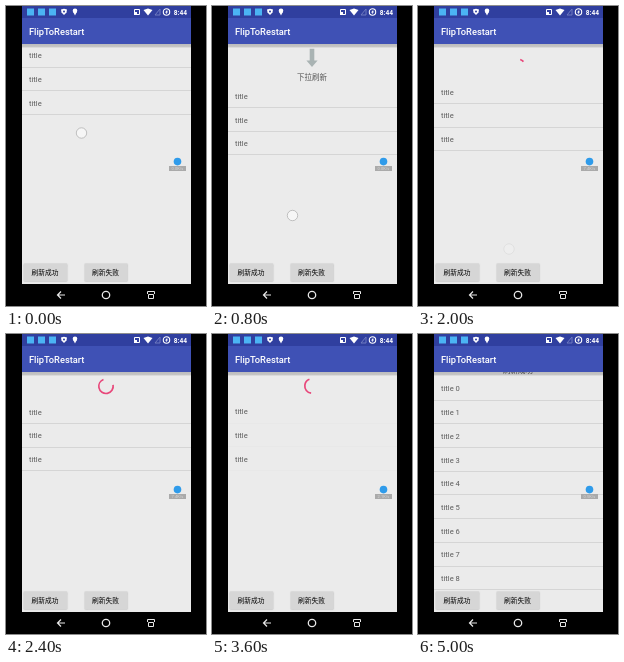
Animation of 200x300 px, one loop 5200 ms. Source, as an HTML page with a canvas:

```html
<!DOCTYPE html>
<html lang="zh">
<head>
<meta charset="utf-8">
<style>
html, body { margin: 0; width: 100%; height: 100%; overflow: hidden; background: #000; }
canvas { display: block; }
</style>
</head>
<body>
<canvas id="stage" width="200" height="300"></canvas>
<script>
const ctx = document.getElementById('stage').getContext('2d');
const LOOP = 5200, STEP = 200, ROW = 23.7;
const RELEASE = 1700, SETTLED = 2600, DONE = 5000;
const FONT = 'Roboto, "Noto Sans CJK SC", "Noto Sans CJK", sans-serif';

// Linear interpolation through [time, value] pairs.
function track(keys, t) {
  const next = keys.findIndex(k => k[0] > t);
  if (next < 0) return keys[keys.length - 1][1];
  if (next === 0) return keys[0][1];
  const [t0, a] = keys[next - 1], [t1, b] = keys[next];
  return a + (b - a) * (t - t0) / (t1 - t0);
}

const fingerX = [[0, 75.5], [800, 80.5], [1000, 88], [1400, 91]];
const fingerY = [[0, 127], [200, 135], [800, 209.5], [1000, 262], [1200, 225], [1400, 236], [1800, 243]];
const fingerAlpha = [[1600, 1], [2000, 0.25], [2200, 0]];
const arrowTurn = [[850, 0], [1000, 180], [1050, 180], [1200, 0], [1340, 0], [1400, 135], [1460, 180]];

function rect(x, y, w, h, color) {
  ctx.fillStyle = color;
  ctx.fillRect(x, y, w, h);
}

function disc(x, y, r, color) {
  ctx.fillStyle = color;
  ctx.beginPath();
  ctx.arc(x, y, r, 0, Math.PI * 2);
  ctx.fill();
}

function polygon(points, color) {
  ctx.fillStyle = color;
  ctx.beginPath();
  points.forEach(([x, y]) => ctx.lineTo(x, y));
  ctx.fill();
}

function outline(color, width, build) {
  ctx.strokeStyle = color;
  ctx.lineWidth = width;
  ctx.beginPath();
  build();
  ctx.stroke();
}

// y is the middle of the line; the baseline snaps to whole pixels.
function text(str, x, y, size, color, align = 'left', weight = 400) {
  ctx.font = `${weight} ${size}px ${FONT}`;
  ctx.fillStyle = color;
  ctx.textAlign = align;
  ctx.textBaseline = 'alphabetic';
  ctx.fillText(str, x, Math.round(y + size * 0.36));
}

function statusBar() {
  rect(16, 0, 169, 12, '#303f9f');
  for (const x of [24.5, 35.5, 46.5]) rect(x - 3.5, 2.5, 7, 7, '#4bb4f4');
  polygon([[55, 3.5], [58, 2.8], [61, 3.5], [60.5, 6.5], [58, 9], [55.5, 6.5]], '#fff');
  disc(58, 5.4, 1, '#303f9f');
  disc(69, 4.8, 2.3, '#fff');
  polygon([[67.2, 6], [70.8, 6], [69, 9.5]], '#fff');
  outline('#fff', 1, () => ctx.rect(128.5, 3.5, 5, 5));
  rect(128, 6, 3, 3, '#fff');
  polygon([[137.5, 4], [142, 2.5], [146.5, 4], [142, 9.5]], '#fff');
  outline('#6f7abf', 1, () => { ctx.moveTo(149, 9); ctx.lineTo(154, 3); ctx.lineTo(154, 9); ctx.closePath(); });
  outline('#fff', 1.1, () => ctx.arc(160.5, 6, 3.2, 0, 7));
  polygon([[161.5, 3.5], [159, 6.5], [160.3, 6.5], [159.8, 8.5], [162.2, 5.6], [160.9, 5.6]], '#fff');
  text('8:44', 181, 6.2, 6.6, '#fff', 'right', 700);
}

function appBar() {
  rect(16, 12, 169, 26, '#3f51b5');
  const shade = ctx.createLinearGradient(0, 38, 0, 42);
  shade.addColorStop(0, 'rgba(0,0,0,.2)');
  shade.addColorStop(0.7, 'rgba(0,0,0,.16)');
  shade.addColorStop(1, 'rgba(0,0,0,0)');
  rect(16, 38, 169, 4, shade);
  text('FlipToRestart', 23, 25.3, 9.3, '#fff', 'left', 500);
}

function navBar() {
  rect(0, 278, 200, 22, '#000');
  outline('#e8e8e8', 1.2, () => {
    ctx.moveTo(59, 289); ctx.lineTo(51.5, 289);
    ctx.moveTo(55, 285.5); ctx.lineTo(51.5, 289); ctx.lineTo(55, 292.5);
  });
  outline('#e8e8e8', 1.3, () => ctx.arc(100, 289, 3.7, 0, 7));
  outline('#e8e8e8', 1, () => {
    ctx.rect(142.5, 288.5, 5, 4);
    ctx.moveTo(141.5, 288); ctx.lineTo(141.5, 285.5); ctx.lineTo(148.5, 285.5); ctx.lineTo(148.5, 288);
  });
}

function button(x, width, label) {
  ctx.save();
  ctx.shadowColor = 'rgba(0,0,0,.3)';
  ctx.shadowBlur = 1.5;
  ctx.shadowOffsetY = 0.7;
  rect(x, 257.5, width, 18, '#d6d6d6');
  ctx.restore();
  text(label, x + width / 2 - 0.4, 266.3, 6.75, '#000', 'center', 500);
}

function arrow(y, degrees) {
  ctx.save();
  ctx.translate(100, y);
  ctx.rotate(degrees * Math.PI / 180);
  polygon([[-2.3, -9.3], [2.3, -9.3], [2.3, 2.5], [5.6, 2.5], [0, 9], [-5.6, 2.5], [-2.3, 2.5]], '#a9b3b3');
  ctx.restore();
}

const clamp = v => Math.max(0, Math.min(1, v));

// Cubic bezier (.4, 0, .2, 1), solved by bisection.
function fastOutSlowIn(x) {
  let lo = 0, hi = 1, s = 0.5;
  for (let i = 0; i < 20; i++) {
    s = (lo + hi) / 2;
    const bx = 1.2 * s * (1 - s) ** 2 + 0.6 * s * s * (1 - s) + s ** 3;
    if (bx < x) lo = s; else hi = s;
  }
  return 3 * s * s * (1 - s) + s ** 3;
}

function spinner(y, t) {
  const cycles = (t - 2000) / 1333 + 0.96;
  const u = cycles % 1, turn = Math.floor(cycles);
  const tail = 288 * fastOutSlowIn(clamp(2 * u - 1));
  const head = 288 * fastOutSlowIn(clamp(2 * u)) + 30;
  const base = 195 + cycles * 200 + turn * 288 - 90 - 296;
  const rad = a => (a + base) * Math.PI / 180;
  outline('#e8477a', 1.7, () => ctx.arc(100, y, 7.2, rad(tail), rad(head)));
}

function list(y, t) {
  const loaded = t >= DONE;
  const count = loaded ? 9 : 3;
  const faint = y > 100 || t >= SETTLED && !loaded;
  for (let i = 0; i < count; i++) {
    const rowY = y + i * ROW;
    rect(16, Math.floor(rowY + ROW - 12.6), 169, 1, faint ? '#e8e8e8' : '#d5d5d5');
    text(loaded ? 'title ' + i : 'title', 23, rowY - 0.3, 7.6, '#5c5c5c');
  }
}

function header(y, t) {
  if (t >= DONE) return text('刷新成功', 100, y - 18.8, 7.5, '#555', 'center');
  if (t >= RELEASE) return spinner(y - 26, t);
  arrow(y - 38.5, track(arrowTurn, t));
  text(y > 100 ? '松开刷新' : '下拉刷新', 100, y - 19.2, 7.5, '#555', 'center');
}

function speedBadge(t) {
  disc(171.5, 155.6, 3.8, '#2f9bea');
  rect(163, 160, 17, 5, '#aaa');
  const speed = Math.floor(t / 1000) * 37 % 90 / 10;
  text(speed.toFixed(1) + 'K/s', 171.5, 162.5, 4, '#d8d8d8', 'center');
}

function finger(t) {
  ctx.globalAlpha = track(fingerAlpha, t);
  const x = track(fingerX, t), y = track(fingerY, t);
  disc(x, y, 5.2, '#f6f6f6');
  outline('#aaa', 0.7, () => ctx.arc(x, y, 5.2, 0, 7));
  ctx.globalAlpha = 1;
}

function listY(t) {
  if (t >= DONE) return 55;
  const pulled = 50 + 0.49 * (track(fingerY, Math.min(t, RELEASE)) - 127);
  const back = clamp((t - RELEASE) / (SETTLED - RELEASE));
  return 78 + (pulled - 78) * (t < RELEASE ? 1 : (1 - back) ** 3);
}

function draw(t) {
  rect(0, 0, 200, 300, '#000');
  rect(16, 38, 169, 240, '#ebebeb');
  ctx.save();
  ctx.beginPath();
  ctx.rect(16, 38, 169, 219);
  ctx.clip();
  const y = listY(t);
  list(y, t);
  header(y, t);
  ctx.restore();
  statusBar();
  appBar();
  button(18, 43, '刷新成功');
  button(78.5, 43, '刷新失败');
  navBar();
  speedBadge(t);
  if (t < DONE) finger(t);
}

function tick() {
  const t = performance.now() % LOOP;
  draw(Math.floor(t / STEP) * STEP);
  requestAnimationFrame(tick);
}
tick();
</script>
</body>
</html>
```
